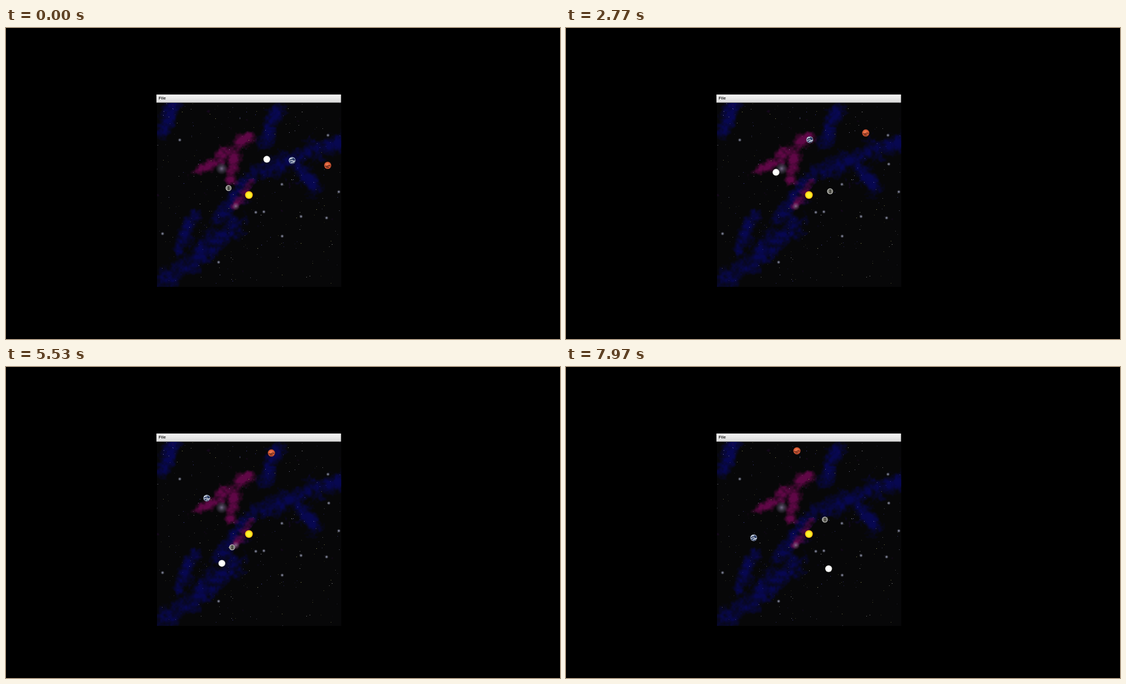
Recreate the animation shown at these times as an HTML page with a canvas. Size 998 px wide and 561 px high, loop 8000 ms.

```html
<!DOCTYPE html>
<html lang="en">
<head>
<meta charset="utf-8">
<title>Solar system</title>
<style>
  html, body { margin: 0; width: 100%; height: 100%; overflow: hidden; background: #000; }
  canvas { display: block; }
</style>
</head>
<body>
<canvas id="stage" width="998" height="561"></canvas>
<script>
const LOOP = 8000, STEP = 100 / 3, ROUNDING = 4;
const SKY = { x: 272, y: 135, size: 332 };
const SUN = { x: 437.6, y: 301.2 };
const ctx = document.getElementById('stage').getContext('2d');

// Angles in degrees, speeds in degrees per second
const planets = [
  { radius: 38.7, angle: 161.3, speed: 75.4, paint: paintMercury },
  { radius: 72, angle: 63.4, speed: 29.64, paint: paintVenus },
  { radius: 99.7, angle: 38.7, speed: 18.23, paint: paintEarth },
  { radius: 151.6, angle: 20.6, speed: 9.74, paint: paintMars }
];

const band = (x1, y1, x2, y2, width) => ({ x1, y1, dx: x2 - x1, dy: y2 - y1, width });
const blueBands = [
  band(305, 138, 278, 185, 19),
  band(487, 145, 468, 205, 16),
  band(465, 255, 600, 205, 21),
  band(532, 250, 555, 288, 18),
  band(445, 260, 385, 345, 18),
  band(415, 355, 285, 455, 25),
  band(335, 335, 310, 400, 15)
];
const pinkBands = [
  band(348, 256, 385, 238, 12),
  band(385, 230, 436, 195, 13),
  band(412, 222, 403, 274, 14),
  band(440, 278, 412, 322, 9)
];

function seededRandom(seed) {
  return () => (seed = seed * 16807 % 2147483647) / 2147483647;
}

function lattice(x, y) {
  const n = Math.sin(x * 127.1 + y * 311.7) * 43758.5453;
  return n - Math.floor(n);
}

function noise(x, y) {
  const ix = Math.floor(x), iy = Math.floor(y);
  const ease = t => t * t * (3 - 2 * t);
  const mix = (a, b, t) => a + (b - a) * t;
  const u = ease(x - ix), v = ease(y - iy);
  return mix(mix(lattice(ix, iy), lattice(ix + 1, iy), u),
             mix(lattice(ix, iy + 1), lattice(ix + 1, iy + 1), u), v);
}

const turbulence = (x, y) =>
  noise(x / 15, y / 15) * 0.4 + noise(x / 7, y / 7) * 0.4 + noise(x / 3, y / 3) * 0.2;

// Strength of the nearest band, falling off with distance from its axis
function density(bands, x, y) {
  return Math.max(...bands.map(b => {
    const along = ((x - b.x1) * b.dx + (y - b.y1) * b.dy) / (b.dx ** 2 + b.dy ** 2);
    const t = Math.min(1, Math.max(0, along));
    const distance = Math.hypot(x - b.x1 - t * b.dx, y - b.y1 - t * b.dy);
    return Math.exp(-((distance / b.width) ** 2));
  }));
}

function cloud(bands, x, y, grain) {
  const value = density(bands, x, y) * 1.3 + (grain - 0.5) * 1.6 - 0.5;
  return Math.min(1, Math.max(0, value));
}

function disc(c, x, y, r, fill) {
  c.fillStyle = fill;
  c.beginPath();
  c.arc(x, y, r, 0, Math.PI * 2);
  c.fill();
}

function glow(c, x, y, r, rgb, alpha) {
  const g = c.createRadialGradient(x, y, 0, x, y, r);
  g.addColorStop(0, `rgba(${rgb},${alpha})`);
  g.addColorStop(0.4, `rgba(${rgb},${alpha * 0.5})`);
  g.addColorStop(1, `rgba(${rgb},0)`);
  disc(c, x, y, r, g);
}

function paintStars(c) {
  const { x: left, y: top, size } = SKY;
  const random = seededRandom(2741);
  const tints = ['190,190,110', '150,150,190', '200,200,200', '90,90,210'];
  for (let i = 0; i < 280; i++) {
    const x = left + Math.floor(random() * size), y = top + Math.floor(random() * size);
    c.fillStyle = `rgba(${tints[i % 4]},${0.2 + random() ** 2 * 0.7})`;
    c.fillRect(x, y, 1, 1);
  }
  glow(c, 388.5, 253.5, 11, '185,165,215', 0.6);
  glow(c, 414, 321.5, 7, '205,165,205', 0.6);
  const landmarks = [
    [313, 202], [580, 193.5], [581.5, 245.5], [497, 282], [599.5, 295.5], [577.5, 342.5],
    [531.5, 340], [464.5, 331.5], [450, 332.5], [497.5, 375.5], [282, 371], [383, 422.5]
  ];
  for (const [x, y] of landmarks) glow(c, x, y, 3.4, '185,190,220', 0.9);
}

function paintSky(c) {
  const { x: left, y: top, size } = SKY;
  const image = c.createImageData(size, size);
  for (let i = 0; i < size * size; i++) {
    const x = left + i % size, y = top + Math.floor(i / size);
    const grain = turbulence(x, y);
    const blue = cloud(blueBands, x, y, grain);
    const pink = cloud(pinkBands, x, y, grain);
    image.data.set([7 + pink * 88, 7, 8 + blue * 72 * (1 - pink) + pink * 62, 255], i * 4);
  }
  c.putImageData(image, left, top);
  paintStars(c);
}

function paintMenu(c) {
  const g = c.createLinearGradient(0, 120, 0, 134.5);
  g.addColorStop(0, '#f8f8f8');
  g.addColorStop(1, '#d8d8d8');
  c.fillStyle = g;
  c.fillRect(271, 120, 332.5, 14.6);
  c.fillStyle = '#222';
  c.font = 'bold 7.5px "Liberation Sans", sans-serif';
  c.fillText('File', 275, 129.4);
}

function paintSun(c) {
  const g = c.createRadialGradient(0, 0.5, 3, 0, 0, 7);
  g.addColorStop(0, '#fff52e');
  g.addColorStop(0.6, '#ffe01c');
  g.addColorStop(1, '#f58a10');
  disc(c, 0, 0, 7, g);
}

function paintMercury(c) {
  disc(c, 0, 0, 5.3, '#c9c9c4');
  disc(c, 0.2, 0, 4.1, '#66665f');
  stroke(c, '#34342f', 1.5, 'M.2-3.4V3.2');
  stroke(c, '#96968c', 1.1, 'M-2.2-1.8V1.6M2.5-2V1');
}

function paintVenus(c) {
  const g = c.createRadialGradient(-0.8, -0.8, 2.5, 0, 0, 6.2);
  g.addColorStop(0, '#fff');
  g.addColorStop(0.7, '#f3f3f0');
  g.addColorStop(1, '#c4c4c0');
  disc(c, 0, 0, 6.2, g);
}

function stroke(c, color, width, path) {
  c.strokeStyle = color;
  c.lineWidth = width;
  c.stroke(new Path2D(path));
}

function paintEarth(c) {
  disc(c, 0, 0, 6.1, '#b9c8dc');
  disc(c, 0.3, 0.3, 5.2, '#15234b');
  stroke(c, '#e6edf4', 1.5, 'M-4.5-2Q-2-4 1-3.3M-4.5 1.5Q-1-1 2 .8T4.7 0M-2 4Q1 2.4 3.4 3.4');
  stroke(c, '#506f9f', 1, 'M1-1.5L4-2.5M-2.5 2.5L0 2.2');
}

function paintMars(c) {
  const g = c.createRadialGradient(-1, -1.5, 1, 0, 0, 6.6);
  g.addColorStop(0, '#ee7950');
  g.addColorStop(0.7, '#d55a34');
  g.addColorStop(1, '#a8442b');
  disc(c, 0, 0, 6.5, g);
  stroke(c, '#612318', 1.4, 'M-4.8 1Q-2 2.5 .5 .8T4.8 1.2M-2.5 3.7L2.5 3.2');
}

function paintAt(painter, x, y) {
  ctx.save();
  ctx.translate(x, y);
  painter(ctx);
  ctx.restore();
}

const backdrop = document.createElement('canvas');
backdrop.width = 998;
backdrop.height = 561;
const back = backdrop.getContext('2d');
back.fillRect(0, 0, 998, 561);
back.save();
back.beginPath();
back.rect(SKY.x, SKY.y, SKY.size, SKY.size);
back.clip();
paintSky(back);
back.restore();
paintMenu(back);

const start = performance.now();
function draw() {
  const elapsed = (performance.now() - start) % LOOP;
  // Steps fall on whole hundredths of a second, slightly before the exact third
  const seconds = Math.floor((elapsed + ROUNDING) / STEP) * STEP / 1000;
  ctx.drawImage(backdrop, 0, 0);
  paintAt(paintSun, SUN.x, SUN.y);
  for (const { radius, angle, speed, paint } of planets) {
    const a = (angle + speed * seconds) * Math.PI / 180;
    paintAt(paint, SUN.x + radius * Math.cos(a), SUN.y - radius * Math.sin(a));
  }
  requestAnimationFrame(draw);
}
draw();
</script>
</body>
</html>
```
